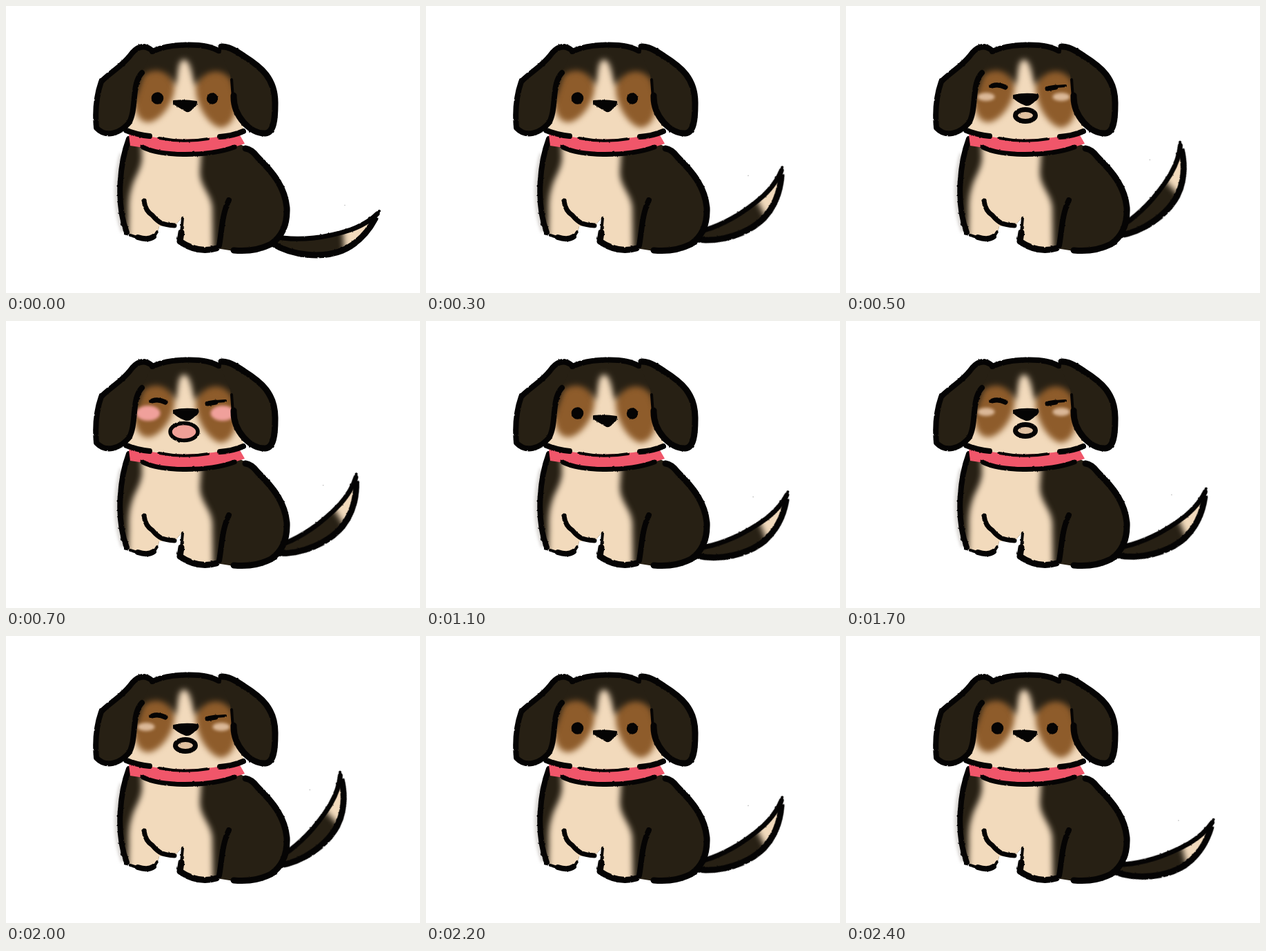
Write an HTML page that moves like this. It is 600 px wide and 417 px high and loops after 2.5 s.

```html
<!DOCTYPE html>
<html lang="en">
<head>
<meta charset="utf-8">
<title>Puppy</title>
<style>
  html, body { margin: 0; width: 100%; height: 100%; overflow: hidden; background: #fff; }
  svg { display: block; width: 100vw; height: 100vh; }
  .ink { fill: none; stroke: #050404; stroke-width: 9; stroke-linecap: round; stroke-linejoin: round; filter: url(#rough); }
  .w4 { stroke-width: 4; }
  .w7 { stroke-width: 7; }
  .w8 { stroke-width: 8; }
  .solid { fill: #050404; stroke: #050404; stroke-width: 2; stroke-linejoin: round; filter: url(#rough); }
  .dark { fill: #272014; }
  .cream { fill: #f2dabc; }
  .brown { fill: #8e5c2b; }
</style>
</head>
<body>
<svg viewBox="0 0 600 417">
  <defs>
    <filter id="rough" filterUnits="userSpaceOnUse" x="0" y="0" width="600" height="417" color-interpolation-filters="sRGB">
      <feTurbulence type="fractalNoise" baseFrequency=".2" numOctaves="2" seed="4"/>
      <feDisplacementMap in="SourceGraphic" scale="2.2" xChannelSelector="R" yChannelSelector="G"/>
    </filter>
    <filter id="soft" filterUnits="userSpaceOnUse" x="0" y="0" width="600" height="417" color-interpolation-filters="sRGB">
      <feGaussianBlur stdDeviation="4"/>
    </filter>
    <filter id="haze" filterUnits="userSpaceOnUse" x="0" y="0" width="600" height="417" color-interpolation-filters="sRGB">
      <feGaussianBlur stdDeviation="2"/>
    </filter>
    <path id="tailShape" d="M380 332 C425 343 470 334 500 324 Q525 315 540 299 C531 323 514 343 488 355 C458 367 415 363 386 345 Z"/>
    <path id="bodyShape" d="M180 193 C165 230 158 285 175 331 L192 337 Q208 340 214 335 Q221 328 222 320 L245 319 L257 305 L252 341 Q275 358 305 352 L330 356 C370 358 403 345 407 300 C404 262 382 236 358 211 L338 200 Z"/>
    <path id="headShape" d="M185 75 Q260 45 326 70 L345 182 Q260 205 177 183 Z"/>
    <clipPath id="tailClip"><use href="#tailShape"/></clipPath>
    <clipPath id="bodyClip"><use href="#bodyShape"/></clipPath>
    <clipPath id="headClip"><use href="#headShape"/></clipPath>
  </defs>

  <g id="tail">
    <use href="#tailShape" class="dark"/>
    <g clip-path="url(#tailClip)"><path class="cream" filter="url(#soft)" d="M487 310 L545 285 L545 340 L491 365 Z"/></g>
    <path class="ink w7" d="M385 334 C425 344 470 335 500 325 Q524 316 538 302"/>
    <path class="ink" d="M386 345 C415 363 458 367 488 355 C512 344 526 326 535 309"/>
    <path class="ink w4" d="M533 311 L541 298"/>
    <circle cx="491" cy="289.5" r=".8" fill="#bbb"/>
  </g>

  <path d="M168 215 C158 250 158 295 170 328" fill="none" stroke="#d8d5d2" stroke-width="7" filter="url(#haze)"/>
  <use href="#bodyShape" class="dark"/>
  <g clip-path="url(#bodyClip)">
    <path class="cream" filter="url(#soft)" d="M196 195 L197 222 C195 240 186 248 182 264 Q177 280 178 300 L177 345 L260 365 L300 365 L299 293 C297 272 282 264 281 242 L284 195 Z"/>
  </g>
  <path class="ink w8" d="M178 193 C166 225 158 285 175 329"/>
  <path class="ink w8" d="M191 336 Q206 341 214 335"/>
  <path class="ink w4" d="M180 333 L193 337 M214 336 L219 328 M256 308 L254 330"/>
  <path class="ink w7" d="M200 283 Q202 298 212 304 C222 316 228 318 244 319"/>
  <path class="ink" d="M254 329 L252 342 Q278 360 305 352"/>
  <path class="ink w8" d="M323 282 C313 303 313 325 309 348"/>
  <path class="ink" d="M347 207 Q356 208 365 220 C386 241 404 262 407 293 C408 318 400 335 384 346 Q360 358 330 355"/>

  <path fill="#f0566a" d="M178 187 L180 203 L200 206 Q260 224 331 205 L346 200 L338 186 Z"/>
  <path class="ink w7" d="M198 205 C225 219 293 219 331 205"/>

  <use href="#headShape" class="cream"/>
  <g clip-path="url(#headClip)">
    <g class="brown" filter="url(#soft)">
      <path d="M184 80 H236 Q245 104 244 120 C243 140 226 165 208 169 C186 170 184 140 184 115 Z"/>
      <path d="M336 80 H284 Q275 104 275 120 C275 142 291 171 310 177 C336 176 336 135 336 115 Z"/>
    </g>
    <path class="dark" filter="url(#soft)" d="M165 40 H345 L340 150 L327 108 C314 89 288 90 275 116 C269 102 268 78 258 78 C248 78 250 102 245 116 C234 89 211 90 199 101 L182 150 Z"/>
  </g>

  <g id="calm">
    <circle cx="219.5" cy="134" r="7.8" class="solid"/>
    <circle cx="299" cy="134.5" r="7.2" class="solid"/>
    <path class="solid" d="M243 138 Q259 136 276 139 Q277 144 271 147 Q267 154 262 153 Q251 147 243 142 Z"/>
  </g>
  <g id="bark">
    <g filter="url(#haze)">
      <ellipse id="cheekL"/>
      <ellipse id="cheekR"/>
    </g>
    <path class="ink w7" d="M212 116 Q221 113 231 118 M292 120 L304 118"/>
    <path class="ink w4" d="M209 117 H214 M304 117 L318 116"/>
    <path class="solid" d="M243 130 Q260 126 278 129 Q280 134 273 138 Q266 145 261 144 Q248 139 243 133 Z"/>
    <ellipse id="mouth" class="ink"/>
  </g>

  <path class="dark" d="M212 64 Q197 53 183 68 C170 87 150 98 138 112 C130 130 129 155 131 177 C145 192 165 185 178 170 C190 150 182 112 197 96 Z"/>
  <path class="dark" d="M309 62 Q322 53 345 73 C369 88 391 105 391 143 C391 165 388 184 376 186 C350 186 328 160 328 125 L325 100 Z"/>
  <path class="ink w8" d="M212 65 Q197 52 183 68 C170 87 150 97 138 110 C131 130 129 155 131 177 C145 192 165 185 178 170 C190 150 181 114 197 97"/>
  <path class="ink" d="M312 59 Q324 58 345 73 C369 88 391 105 390 143 C390 165 388 184 376 185 C354 186 329 160 330 130"/>
  <path class="ink w4" d="M329 135 L327 107"/>
  <path class="ink w8" d="M212 66 C236 55 286 52 308 65"/>
  <path class="ink w8" d="M170 179 Q188 187 208 189 M310 190 Q328 189 344 182"/>
  <path class="ink w4" d="M222 192 Q258 199 293 193"/>
</svg>
<script>
  const LOOP = 2500, STEP = 100, STEPS = LOOP / STEP;
  // [step, degrees]; the second half of the loop mirrors the first
  const WAG = [[0, 0], [1, -11], [3, -23.4], [5, -40], [7, -28.4], [9, -11],
               [10, -10.5], [11, -17.9], [12, -24]];
  const byId = id => document.getElementById(id);

  function set(id, attrs) {
    for (const name in attrs) byId(id).setAttribute(name, attrs[name]);
  }

  function wagAngle(step) {
    const i = WAG.findIndex(key => key[0] >= step);
    if (i < 1) return WAG[0][1];
    const [s0, a0] = WAG[i - 1], [s1, a1] = WAG[i];
    return a0 + (a1 - a0) * (step - s0) / (s1 - s0);
  }

  function drawBark(full) {
    const cheek = full
      ? { rx: 17.5, ry: 11, cy: 134, fill: "#f0a09b" }
      : { rx: 12.5, ry: 6, cy: 132, fill: "#dbb898" };
    set("cheekL", { ...cheek, cx: full ? 206 : 203 });
    set("cheekR", { ...cheek, cx: full ? 314 : 312 });
    set("mouth", full
      ? { cx: 258, cy: 161, rx: 20, ry: 12.5, style: "stroke-width:5.5;fill:#f0a097" }
      : { cx: 260, cy: 159, rx: 14.5, ry: 8.5, style: "stroke-width:7;fill:#dfc0a0" });
  }

  function draw(ms) {
    const step = Math.floor((ms % LOOP) / STEP);
    const pose = Math.min(step, STEPS - step);
    const barking = pose >= 5 && pose <= 8;
    set("tail", { transform: `rotate(${wagAngle(pose)} 375 326)` });
    set("calm", { visibility: barking ? "hidden" : "visible" });
    set("bark", { visibility: barking ? "visible" : "hidden" });
    if (barking) drawBark(pose === 6 || pose === 7);
  }

  const start = performance.now();
  function tick() {
    draw(performance.now() - start);
    requestAnimationFrame(tick);
  }
  tick();
</script>
</body>
</html>
```
